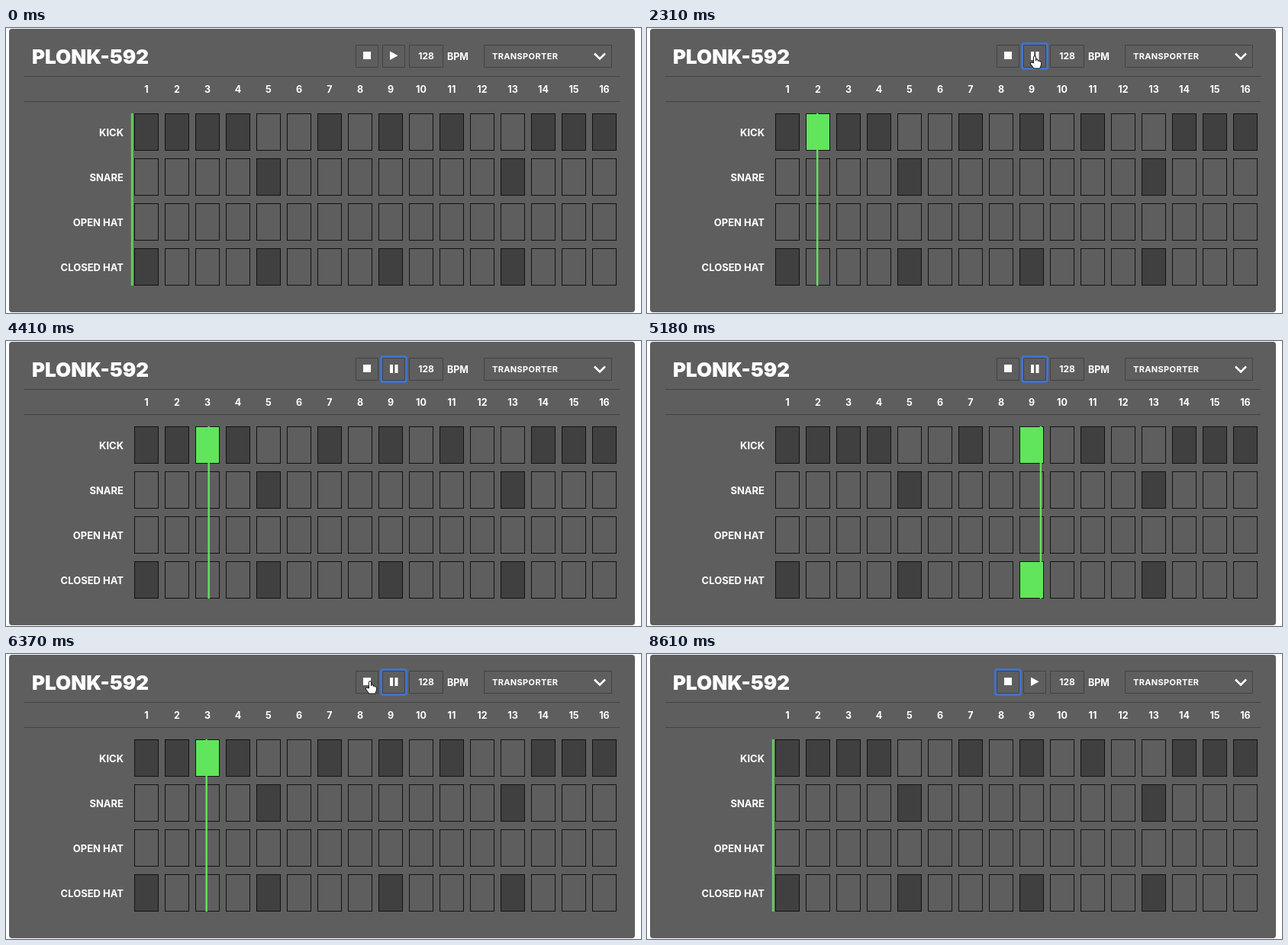
An HTML page that plays this animation: 832x374 px, repeating every 9170 ms.

```html
<!DOCTYPE html>
<html lang="en">
<head>
<meta charset="utf-8">
<title>Drum machine</title>
<style>
  html, body { margin: 0; width: 100%; height: 100%; overflow: hidden; background: #fff; }
  svg { display: block; font: 700 13px Inter, "Liberation Sans", sans-serif; }
  text { fill: #fff; }
  .title { font-size: 26px; font-weight: 900; }
  .small { font-size: 12px; }
  .select { font-size: 11px; letter-spacing: .35px; }
  .num { font-size: 12.5px; text-anchor: middle; }
  .label { text-anchor: end; }
  .box, .rule { fill: none; stroke: #424242; }
  .cell { fill: none; stroke: #121212; }
  .on { fill: #404040; }
  .lit { fill: #61e55c; }
  .icon { fill: #fff; }
</style>
</head>
<body>
<svg id="stage" width="832" height="374" viewBox="0 0 832 374">
  <rect x="4" y="1" width="820" height="372" rx="4" fill="#5e5e5e"/>
  <text class="title" x="34" y="47">PLONK-592</text>
  <path class="rule" d="M24 63.5H804M24 96.5H804"/>
  <path class="box" d="M458.5 22.5h29v29h-29zM493.5 22.5h29v29h-29zM528.5 22.5h44v29h-44zM626.5 22.5h167v29h-167z"/>
  <rect id="ring" y="20.5" width="33" height="33" rx="2.5" fill="none" stroke="#4472c8" stroke-width="3"/>
  <path class="icon" d="M468 31h10v10h-10z"/>
  <path class="icon" id="toggle"/>
  <text class="small" x="550.5" y="41.3" text-anchor="middle">128</text>
  <text class="small" x="578" y="42" style="font-size:12.5px">BPM</text>
  <text class="select" x="637" y="41">TRANSPORTER</text>
  <path d="M771 33.5l7 7 7-7" fill="none" stroke="#fff" stroke-width="2.6"/>
  <g id="grid"></g>
  <rect id="bar" y="112" height="226"/>
  <g id="cursor" stroke="#111" fill="#fff" stroke-linejoin="round">
    <path id="hand" d="M-1.6 9V1.2Q-1.4-.4 0-.4T1.5 1.2V6Q3-.1 4.2 6.3Q5.6 5 6.5 7Q8.6 6 8.6 8.5V11L6.8 16H-1.2L-5.6 10Q-6.2 7.8-4 8Z"/>
    <path id="arrow" fill="#111" stroke="#fff" d="M0 0V15L3.5 11.8 5.8 17 8.2 16 6 11H10.5Z"/>
  </g>
</svg>
<script>
const $ = id => document.getElementById(id);
const LOOP = 9170, TICK = 70, START = 2131, PLAY = 2100, STOP = 7210;
const SPEED = 0.325, LEFT = 165, STEP = 40, STEPS = 16;
const tracks = [
  ['KICK', [1, 2, 3, 4, 7, 9, 11, 14, 15, 16]],
  ['SNARE', [5, 13]],
  ['OPEN HAT', []],
  ['CLOSED HAT', [1, 5, 9, 13]]
];
// Pointer trips: [time, x, y] stops, hidden between trips
const trips = [
  [[70, 786, 338], [980, 533, 40], [1400, 533, 40], [1890, 508, 37],
   [2450, 508, 37], [2870, 524, 385]],
  [[6160, 498, 385], [6370, 477, 36], [6930, 477, 36], [7000, 478, 43],
   [7280, 478, 43], [7560, 475, 45], [7840, 475, 45], [8190, 610, 222], [8470, 700, -20]]
];

function add(tag, attrs, text = '') {
  const el = document.createElementNS('http://www.w3.org/2000/svg', tag);
  for (const k in attrs) el.setAttribute(k, attrs[k]);
  el.textContent = text;
  return $('grid').appendChild(el);
}

const active = [];
for (let i = 0; i < STEPS; i++) add('text', { class: 'num', x: 184 + STEP * i, y: 85 }, i + 1);
tracks.forEach(([name, hits], row) => {
  const y = 112.5 + 59 * row;
  add('text', { class: 'label', x: 154, y: y + 29.5 }, name);
  for (let i = 0; i < STEPS; i++) {
    const on = hits.includes(i + 1);
    const el = add('rect', { class: on ? 'cell on' : 'cell', x: 168.5 + STEP * i, y, width: 31, height: 48 });
    if (on) active.push({ el, i });
  }
});

function pointerAt(t) {
  const trip = trips.find(p => t >= p[0][0] && t < p[p.length - 1][0]);
  if (!trip) return null;
  const n = trip.findIndex(p => p[0] > t);
  const [t0, x0, y0] = trip[n - 1], [t1, x1, y1] = trip[n];
  const u = (t - t0) / (t1 - t0), e = u * u * (3 - 2 * u);
  return [x0 + (x1 - x0) * e, y0 + (y1 - y0) * e];
}

const show = (el, on) => el.setAttribute('display', on ? 'inline' : 'none');

function draw(t) {
  const playing = t >= PLAY && t < STOP;
  const pos = playing ? Math.max(0, t - START) * SPEED % (STEP * STEPS) : 0;
  const step = playing && t > START ? Math.floor(pos / STEP) : -1;
  for (const { el, i } of active) el.classList.toggle('lit', i === step);

  const bar = $('bar'), width = step < 0 ? 3 : 2.4;
  bar.setAttribute('x', LEFT + pos - width / 2 + (step < 0 ? .3 : 0));
  bar.setAttribute('width', width);
  bar.setAttribute('fill', step < 0 ? '#62cc60' : '#61e55c');

  $('toggle').setAttribute('d', playing
    ? 'M503 31h4v11h-4zM509.5 31h4v11h-4z'
    : 'M503 30.5L513.5 36.2 503 42z');
  show($('ring'), t >= PLAY);
  $('ring').setAttribute('x', playing ? 491.5 : 456.5);

  const p = pointerAt(t);
  show($('cursor'), p);
  if (p) {
    const [x, y] = p;
    const hover = y > 21 && y < 53 && x > 457 && x < 524;
    $('cursor').setAttribute('transform', `translate(${x} ${y})`);
    show($('hand'), hover);
    show($('arrow'), !hover);
  }
}

const origin = performance.now();
function loop() {
  const t = (performance.now() - origin) % LOOP;
  draw(Math.floor(t / TICK) * TICK);
  requestAnimationFrame(loop);
}
loop();
</script>
</body>
</html>
```
